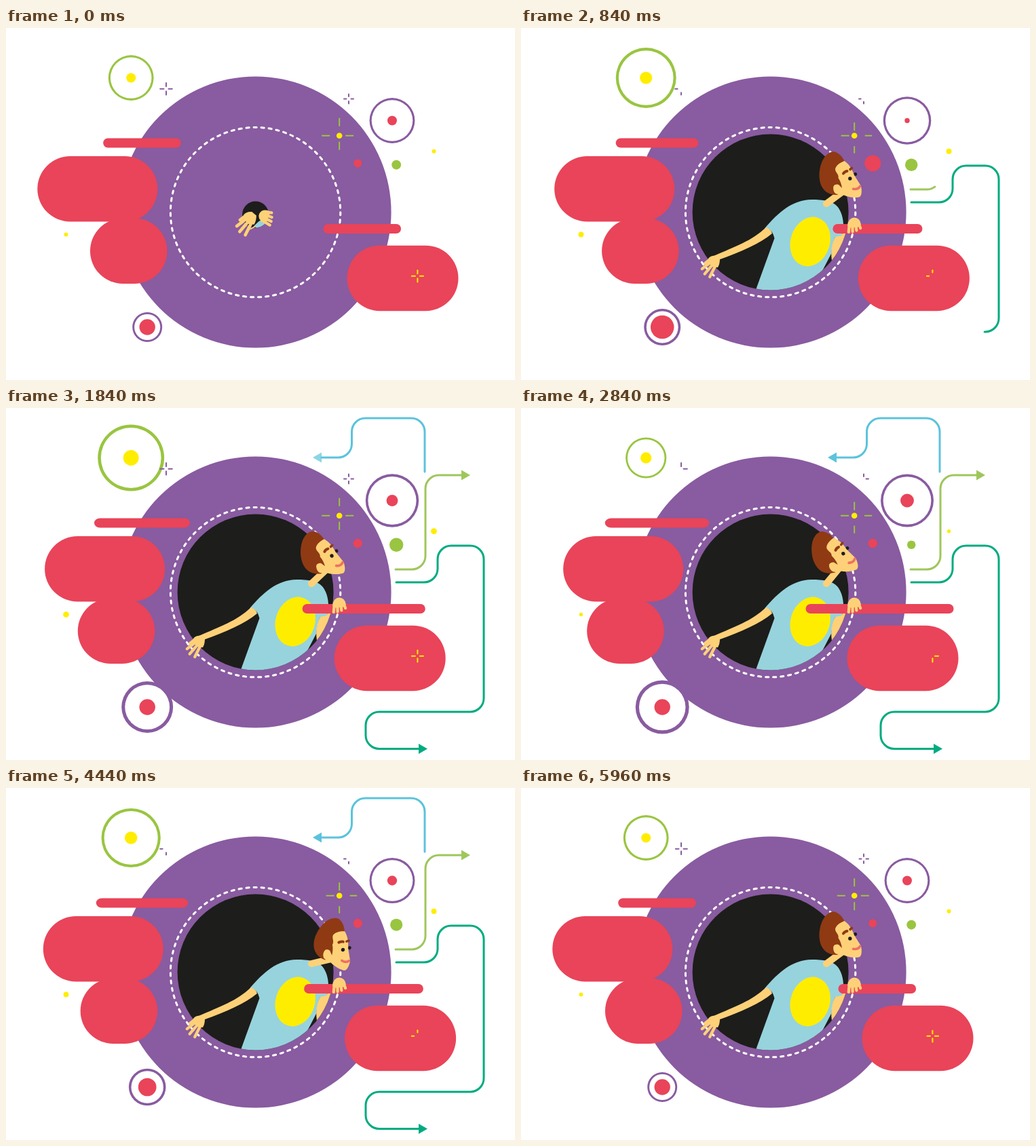
Animation, 750 px wide and 519 px high, one loop 6000 ms. Source, as an HTML page with a canvas:

```html
<!DOCTYPE html>
<html lang="en">
<head>
<meta charset="utf-8">
<title>Through the hole</title>
<style>
  html, body { margin: 0; width: 100%; height: 100%; overflow: hidden; background: #fff; }
  canvas { display: block; }
</style>
</head>
<body>
<canvas id="stage" width="750" height="519"></canvas>
<script>
const LOOP = 6000;
const ctx = document.getElementById('stage').getContext('2d');
const RED = '#e94459', PURPLE = '#895ba0', GREEN = '#99c540', YELLOW = '#ffed00',
      BLACK = '#1d1d1b', SKIN = '#fed178', HAIR = '#8f3a13', SHIRT = '#97d3dd';

// ---------- timing ----------
const clamp = v => Math.min(1, Math.max(0, v));
const mix = (a, b, p) => a + (b - a) * p;
const ease = p => 0.5 - 0.5 * Math.cos(Math.PI * clamp(p));
const span = (t, a, b) => clamp((t - a) / (b - a));
const swell = (t, period = LOOP) => 1 - Math.cos(2 * Math.PI * Math.min(t / period, 1));

// Eased motion between a few [time, value] turning points.
const keys = (...pts) => t => {
  let i = 0;
  while (i < pts.length - 2 && t > pts[i + 1][0]) i++;
  const [t0, a] = pts[i], [t1, b] = pts[i + 1];
  return mix(a, b, ease(span(t, t0, t1)));
};

const pulse = keys([0, 33.4], [1500, 52], [2900, 30], [4300, 43.8], [6000, 33.4]);
const yellowCore = keys([0, 7], [1750, 11.5], [3400, 7], [4500, 9.3], [6000, 7]);
const pinkCore = keys([0, 7], [800, 3.7], [2400, 10.2], [4800, 7]);
const lowCore = keys([0, 11.7], [840, 17.3], [1900, 11.7], [2900, 11.7], [3960, 13.9], [5400, 11.7]);
const redDot = keys([0, 6], [840, 12], [2000, 6.4], [2700, 6.4], [3480, 12], [4700, 6]);
const lowRing = keys([0, 22], [2400, 40.3], [5600, 22]);
const barGrow = keys([0, 0], [3160, 53], [6000, 0]);
const headTurn = keys([900, 0], [2780, -14], [2900, -14], [3800, 23], [4400, 23], [5700, 0]);

// Sparkles shorten from one end, then from the other.
const SPARK = 3600;
const trimEnd = keys([0, 1], [920, .18], [1800, 1]);
const trimStart = keys([2200, 0], [3000, .36], [3600, .1]);

// ---------- drawing helpers ----------
function disc(x, y, r, color) {
  ctx.fillStyle = color;
  ctx.beginPath();
  ctx.arc(x, y, r, 0, 7);
  ctx.fill();
}
function oval(x, y, rx, ry, turn, color) {
  ctx.fillStyle = color;
  ctx.beginPath();
  ctx.ellipse(x, y, rx, ry, turn, 0, 7);
  ctx.fill();
}
function ring(x, y, outer, width, color) {
  disc(x, y, outer, color);
  disc(x, y, outer - width, '#fff');
}
function pill(x, y, w, h, rx = h / 2) {
  ctx.fillStyle = RED;
  ctx.beginPath();
  ctx.roundRect(x, y, w, h, [{ x: rx, y: h / 2 }]);
  ctx.fill();
}
function line(x0, y0, x1, y1, w, color, cap = 'round') {
  ctx.strokeStyle = color;
  ctx.lineWidth = w;
  ctx.lineCap = cap;
  ctx.beginPath();
  ctx.moveTo(x0, y0);
  ctx.lineTo(x1, y1);
  ctx.stroke();
}
function strokePath(d, w, color) {
  ctx.strokeStyle = color;
  ctx.lineWidth = w;
  ctx.lineCap = 'round';
  ctx.stroke(new Path2D(d));
}
function fillPath(d, color) {
  ctx.fillStyle = color;
  ctx.fill(new Path2D(d));
}
function group(draw) {
  ctx.save();
  draw();
  ctx.restore();
}

// ---------- arrows ----------
const arrows = [
  { color: '#00ab80', from: 200, to: 1330, len: 684, dir: 1,
    pts: [[575, 257], [636, 257], [636, 203], [704, 203], [704, 448], [530, 448], [530, 502.5], [608, 502.5]] },
  { color: '#9fc65c', from: 600, to: 1500, len: 220, dir: 1,
    pts: [[574, 238], [618, 238], [618, 99], [671, 99]] },
  { color: '#5bc3dc', from: 860, to: 1700, len: 266, dir: -1,
    pts: [[617, 94], [617, 15], [509.5, 15], [509.5, 73], [465, 73]] }
];
function arrow({ color, from, to, len, dir, pts }, t) {
  const p = ease(span(t, from, to)), fade = 1 - span(t, 5200, 5700);
  if (!p || !fade) return;
  const last = pts.length - 1, [x, y] = pts[last];
  group(() => {
    ctx.globalAlpha = fade;
    ctx.strokeStyle = color;
    ctx.lineWidth = 3;
    ctx.lineCap = 'round';
    if (p < 1) ctx.setLineDash([len * p, 2000]);
    ctx.beginPath();
    ctx.moveTo(...pts[0]);
    for (let i = 1; i < last; i++) ctx.arcTo(...pts[i], ...pts[i + 1], 20);
    ctx.lineTo(x, y);
    ctx.stroke();
    ctx.globalAlpha = fade * span(t, to, to + 200);
    fillPath(`M${x} ${y - 7.5}L${x + 13 * dir} ${y}L${x} ${y + 7.5}Z`, color);
  });
}

// ---------- sparkles ----------
function sparkle(x, y, t, reach, color, up) {
  const a = mix(-reach, reach, trimStart(t)), b = mix(-reach, reach, trimEnd(t));
  for (const [lo, hi] of [[-reach, -3.5], [3.5, reach]]) {
    const s = Math.max(a, lo), e = Math.min(b, hi);
    if (e <= s) continue;
    line(x + s, y, x + e, y, 2, color);
    line(x, y + s * up, x, y + e * up, 2, color);
  }
}
function bigSparkle(x, y, t) {
  group(() => {
    ctx.setLineDash([12, 23]);
    ctx.lineDashOffset = -8 * (1 - trimEnd(t)) - 18 * trimStart(t);
    line(x - 26, y, x + 26, y, 2, GREEN, 'butt');
    line(x, y - 26, x, y + 26, 2, GREEN, 'butt');
  });
  disc(x, y, 4.3, YELLOW);
}

// ---------- man ----------
function torso(size) {
  fillPath('M346 386L373.5 310Q371 300 366 297L359 295.5C380 271 400 253.5 428 253' +
    'C445 253 459 255 466 263C472 270 476 282 475 298L472 308L463 308Q458 318 457.5 332' +
    'L443 360L436 390Z', SHIRT);
  fillPath('M463 308L472 306L478 296L486 298L478 312L467 331L458 343Q455 322 463 308Z', SKIN);
  oval(426.2, 315, 29 * size, 37 * size, .3, YELLOW);
}
function arm() {
  fillPath('M361 294C340 314 316 322 284 336L292 341.5C324 330 352 318 370 303Q369 297 361 294Z', SKIN);
}
function head(angle, size) {
  if (size <= 0) return;
  group(() => {
    ctx.translate(450, 259);
    ctx.rotate(angle * Math.PI / 180);
    ctx.scale(size, size);
    ctx.translate(-450, -259);
    line(450, 259, 473, 242, 10, SKIN);
    disc(492.6, 215.6, 2.5, BLACK);
    fillPath('M475 195C484 200 489 211 491 217L501 233C502.5 240 502.5 248 498 249.5' +
      'C488 251 476 248 470 243L462 240L458 225L460 203Z', SKIN);
    fillPath('M461 182.3C469 184 474 191 476.5 196C469 199 464 203 463 208C463 213 469 216 467.5 221' +
      'Q472 228 473 236L468 231C463 229 459 233 461 239L467 246C450 247 440 236 439.5 218' +
      'C440 197 449 183 461 182.3Z', HAIR);
    oval(464.3, 238, 4, 7, -.25, SKIN);
    strokePath('M475 214.5Q477 211.5 480.5 211', 4, HAIR);
    strokePath('M485 208.5L487.5 206.5', 3.6, HAIR);
    disc(484.8, 222, 2.7, BLACK);
    strokePath('M489.5 237.3Q496.5 238.5 499.5 233.5', 3.6, '#ee7064');
  });
}
function hand(x, y, turn, size, palm, finger) {
  group(() => {
    ctx.translate(x, y);
    ctx.rotate(turn);
    ctx.scale(size, size);
    fillPath(palm, SKIN);
    for (let i = 0; i < 4; i++) line(...finger(i), 4.2, SKIN);
  });
}
const leftPalm = 'M-8 -5Q-4 -10 3 -9L9 -4Q9 3 6 8L-2 7L-7 2Z';
const leftFinger = i => {
  const a = 3 - .39 * i, reach = 23 - 10 * .3 ** i;
  return [2.4 * i - 4, 3 * i - 5, reach * Math.cos(a), reach * Math.sin(a)];
};
const rightPalm = 'M-10 0Q-8 -12 0 -12Q8 -12 10 -2L6 2L-6 3Z';
const rightFinger = i => [4.4 * i - 7, -4, 5.8 * i - 8.2, 9.5 - .65 * i * i];

// ---------- scene ----------
function draw(t) {
  const open = ease(span(t, 0, 680)), spark = t % SPARK;
  const hole = mix(19.5, 115, open), cx = 367.6, cy = mix(275, 271.5, open);
  const place = s => {
    ctx.translate(cx, cy + (1 - s) * 15);
    ctx.scale(s, s);
    ctx.translate(-cx, -271.5);
  };

  ctx.fillStyle = '#fff';
  ctx.fillRect(0, 0, 750, 519);
  disc(cx, 271.5, 200, PURPLE);

  group(() => {
    ctx.strokeStyle = '#fff';
    ctx.lineWidth = 3;
    ctx.lineCap = 'round';
    ctx.setLineDash([4.2, 250.4 * Math.PI / 71 - 4.2]);
    ctx.beginPath();
    ctx.arc(cx, 271.7, 125.2, 0, 2 * Math.PI);
    ctx.stroke();
  });

  // clouds and left bar
  const s = swell(t);
  pill(46.3 + 8 * s, 189, 177, 96.5);
  pill(124 - 13.5 * s, 280.5, 113.5, 96.5);
  const half = 57.3 + 9.8 * s;
  pill(200.5 - half, 162.5, half * 2, 14, 7 * half / 57.3);
  pill(502.5 - 11.4 * swell(t, 5080), 320.7, 164, 96.5);

  // rings and dots
  const r = pulse(t);
  ring(184.2, 73.5, r, r * .093, GREEN);
  disc(184.2, 73.5, yellowCore(t), YELLOW);
  const r2 = 33.4 + 3.2 * swell(t, 4600);
  ring(569, 136.5, r2, r2 * .093, PURPLE);
  disc(569, 136.5, pinkCore(t), RED);
  const r3 = lowRing(t);
  ring(208.2, 441, r3, r3 * .132, PURPLE);
  disc(208.2, 441, lowCore(t), RED);
  disc(575.2, 201.7, r * .208, GREEN);
  disc(518.3, 199.5, redDot(t), RED);
  disc(630.5, 181.7, r * .09, YELLOW);
  disc(88.5, 304.5, r * .089, YELLOW);

  sparkle(236, 89.8, spark, 8.8, PURPLE, -1);
  sparkle(505, 104.4, spark, 7, PURPLE, -1);
  sparkle(606.4, 365.8, spark, 8.6, YELLOW, 1);
  bigSparkle(491.2, 158.7, spark);
  arrows.forEach(a => arrow(a, t));

  // hole and man
  const grown = mix(.3, 1, open);
  disc(cx, cy, hole, BLACK);
  group(() => {
    ctx.beginPath();
    ctx.arc(cx, cy, hole, 0, 7);
    ctx.clip();
    place(grown);
    torso(open);
  });
  group(() => {
    place(hole / 115);
    arm();
  });
  group(() => {
    place(grown);
    head(headTurn(t), open);
  });

  const grow = barGrow(t), mid = 524.8 + grow * .072;
  pill(mid - 57.3 - grow, 289, 114.6 + 2 * grow, 14);

  hand(mix(359, 284, open), mix(281, 345, open), 0, mix(1.1, 1, open), leftPalm, leftFinger);
  hand(mix(384, 491, open), mix(279, 291.5, open), mix(-1.1, 0, open), 1, rightPalm, rightFinger);
}

const start = performance.now();
function tick() {
  draw((performance.now() - start) % LOOP);
  requestAnimationFrame(tick);
}
tick();
</script>
</body>
</html>
```
